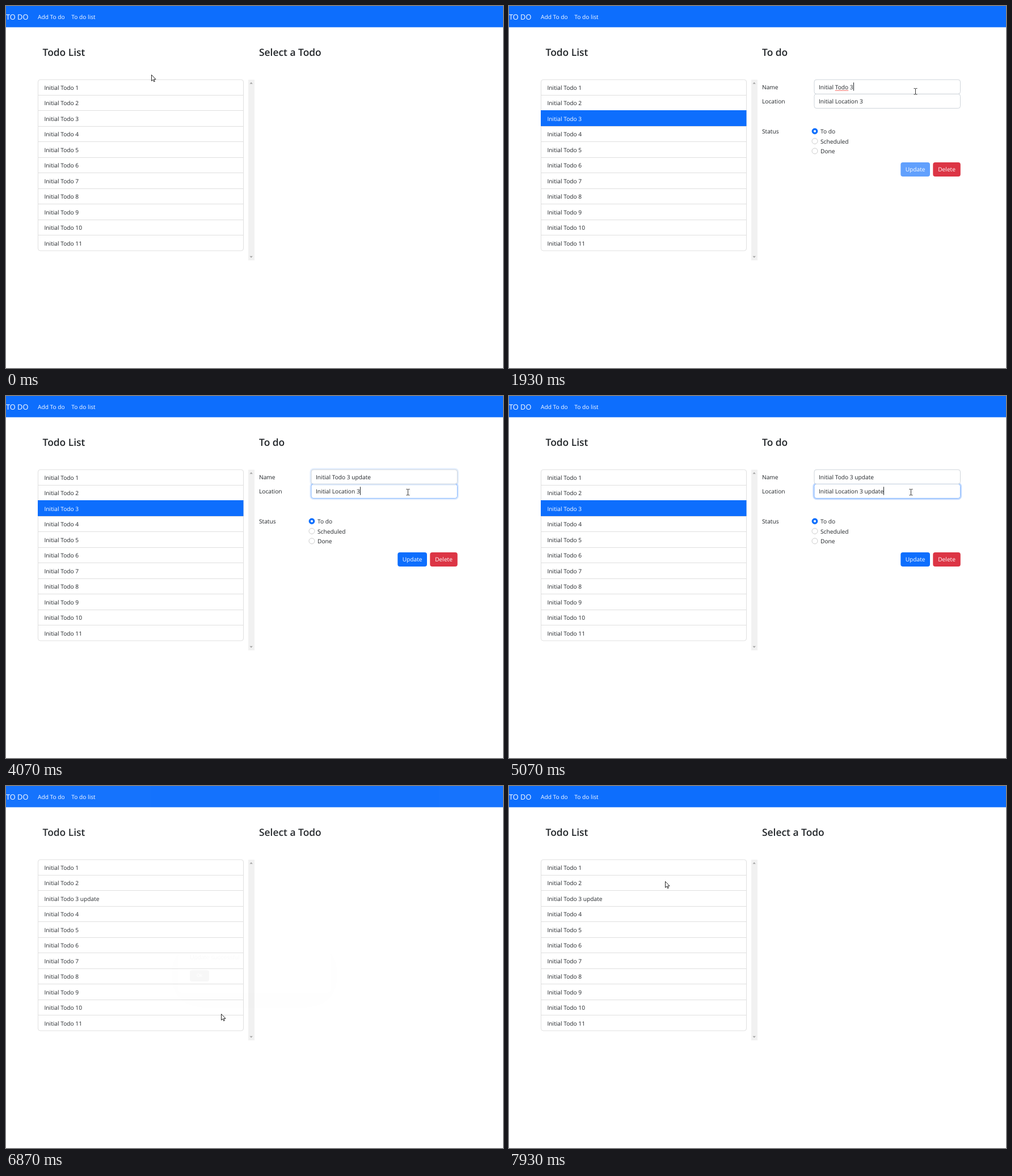
Write an HTML page that moves like this. It is 876 by 639 pixels and loops after 8 s.

```html
<!DOCTYPE html>
<html lang="en">
<head>
<meta charset="utf-8">
<title>Todo List</title>
<style>
  html, body { margin: 0; width: 100%; height: 100%; overflow: hidden; background: #fff; }
  #stage { position: relative; width: 876px; height: 639px; overflow: hidden; }
  svg, #veil { position: absolute; left: 0; top: 0; width: 876px; height: 639px; }
  text {
    font: 400 10.2px "Open Sans", "Noto Sans", sans-serif;
    fill: #212529; white-space: pre; text-rendering: geometricPrecision;
  }
  text.h { font-size: 17.4px; font-weight: 600; }
  text.brand { font-size: 12.8px; }
  text.w { fill: #fff; }
  text.mid { text-anchor: middle; }
  #veil { background: rgba(255, 255, 255, .9); visibility: hidden; }
  #box {
    position: absolute; left: 304px; top: 275px; width: 268px; height: 89.5px;
    border-radius: 6.7px; background: #fff; box-shadow: 0 13.4px 50px rgba(0, 0, 0, .13);
    font: 10.7px/14px "Liberation Sans", Arial, sans-serif; color: #666;
    text-rendering: geometricPrecision;
  }
  #box p { position: absolute; left: 20px; top: 20.5px; margin: 0; white-space: nowrap; }
  #ok {
    position: absolute; left: 20px; top: 49.5px; width: 34px; height: 20px;
    border-radius: 3.4px; background: #333; color: #eee;
    font-size: 8px; line-height: 20px; text-align: center;
  }
</style>
</head>
<body>
<div id="stage">
  <svg id="page"></svg>
  <div id="veil"><div id="box"><p>Update successful</p><div id="ok">Ok</div></div></div>
  <svg id="top"></svg>
</div>
<script>
const LOOP = 8000, BLUE = '#0d6efd', LINE = '#dfdfdf', ROW = 27.45;
const $ = id => document.getElementById(id);
const page = $('page');

function el(tag, attrs, parent = page) {
  const node = document.createElementNS('http://www.w3.org/2000/svg', tag);
  set(node, attrs);
  parent.appendChild(node);
  return node;
}
function set(node, attrs) {
  for (const k in attrs) node.setAttribute(k, attrs[k]);
}
function rect(x, y, width, height, fill, parent, more) {
  return el('rect', { x, y, width, height, fill, ...more }, parent);
}
function label(x, y, str, parent, cls = '') {
  const node = el('text', { x, y, class: cls }, parent);
  node.textContent = str;
  return node;
}
function show(node, on) { node.style.display = on ? '' : 'none'; }
const mix = (a, b, p) => a + (b - a) * p;
const clamp = v => Math.max(0, Math.min(1, v));
const smooth = p => p * p * (3 - 2 * p);

// Header
rect(0, 0, 876, 37.5, BLUE);
label(0, 24, 'TO DO', page, 'brand w');
label(56, 23, 'Add To do', page, 'w');
label(115.3, 23, 'To do list', page, 'w');
label(64.5, 88.3, 'Todo List', page, 'h');
const title = label(446, 88.3, '', page, 'h');

// List
const rowTop = i => Math.floor(130 + ROW * i);
rect(56.5, 130, 362, 302, '#fff', page, { rx: 4, stroke: LINE });
for (let i = 1; i < 11; i++) rect(57, rowTop(i), 361, 1, LINE);
const mark = rect(56, 0, 362.5, 28, BLUE);
const rows = Array.from({ length: 11 }, (_, i) =>
  label(67.5, 148 + ROW * i, 'Initial Todo ' + (i + 1)));

// Scrollbar
rect(427, 130, 11, 319, '#f1f1f1');
el('path', { d: 'M429.5 137.5h5.4l-2.7-3zM429.5 441.5h5.4l-2.7 3z', fill: '#a3a3a3' });

// Form
const form = el('g', {});
label(446, 146.6, 'Name', form);
label(446, 172, 'Location', form);
label(446, 225, 'Status', form);

function field(y) {
  const ring = rect(536.7, y - 1.3, 260.1, 28, 'none', form,
    { rx: 5.5, stroke: BLUE, 'stroke-opacity': .25, 'stroke-width': 2.7 });
  const frame = rect(538, y, 257.5, 25.3, '#fff', form, { rx: 4 });
  const text = label(546, y + 16.6, '', form);
  const caret = rect(0, y + 5, 1, 14.5, '#212529', form);
  return { ring, frame, text, caret };
}
const place = field(155.3), name = field(130);
const squiggle = rect(0, 148.6, 0, 1, '#f0615a', form);

const radios = ['To do', 'Scheduled', 'Done'].map((str, i) => {
  const at = { cx: 539, cy: 221 + 17.5 * i };
  label(549, at.cy + 4, str, form);
  return {
    ring: el('circle', { ...at, r: 6.7, fill: BLUE, 'fill-opacity': .25 }, form),
    disc: el('circle', { ...at, r: 5 }, form),
    dot: el('circle', { ...at, r: 2.1, fill: '#fff' }, form)
  };
});

function button(x, width, str, fill) {
  const g = el('g', {}, form);
  const face = rect(x, 276, width, 25, fill, g, { rx: 4 });
  label(x + width / 2, 292.4, str, g, 'w mid');
  return { g, face };
}
const update = button(690.3, 51.7, 'Update', BLUE);
button(747.3, 48.5, 'Delete', '#dc3545');

// Pointer
const arrow = el('path', {
  d: 'M.5.5V11.3L3 9l1.7 3.7 1.6-.7L4.7 8.4H8Z',
  fill: '#fff', stroke: '#111', 'stroke-width': .9
}, $('top'));
const beam = el('path', {
  d: 'M-2.5-4.5H-.5L.5-4l1-.5H3.500M.5-4V6M-2.5 6H-.5L.5 5.500l1 .5H3.500',
  fill: 'none', stroke: '#222', 'stroke-width': .9
}, $('top'));

// Pointer stops: time, x, y
const PATH = [
  [0, 256, 121], [200, 250, 140], [400, 250, 140], [730, 246, 166],
  [800, 246, 166], [1070, 239, 197], [1270, 239, 197], [1400, 300, 190],
  [1600, 500, 165], [1800, 680, 148], [1930, 716, 150], [3600, 716, 150],
  [4000, 708, 169], [5270, 708, 169], [5600, 550, 255], [5670, 533, 263],
  [5730, 536, 258], [5930, 536, 258], [6400, 712, 290], [6600, 716, 288],
  [6670, 690, 303], [6730, 620, 326], [6800, 480, 368], [6870, 379, 402],
  [7130, 354, 362], [7330, 339, 324], [7600, 339, 324], [7870, 270, 172],
  [7930, 275, 168], [LOOP, 275, 168]
];
function pointer(t) {
  const i = PATH.findIndex(p => p[0] > t);
  const a = PATH[i - 1], b = PATH[i], p = (t - a[0]) / (b[0] - a[0]);
  return [mix(a[1], b[1], p), mix(a[2], b[2], p)];
}

// A space at one moment, then "update" at 15 letters a second
function typed(t, space, start) {
  if (t < space) return '';
  const n = t < start ? 0 : Math.round((t - start) * .015) + 1;
  return '\u00a0' + 'update'.slice(0, n);
}

function drawField(f, str, focus, caretOn) {
  if (f.text.textContent !== str) f.text.textContent = str;
  set(f.ring, { opacity: focus });
  set(f.frame, { stroke: focus > .5 ? '#86b7fe' : '#ced4da' });
  show(f.caret, caretOn);
  if (caretOn) set(f.caret, { x: Math.round(546 + f.text.getComputedTextLength()) });
}

const fade = $('veil').animate([{ opacity: 0 }, { opacity: 1 }],
  { duration: 500, easing: 'ease', fill: 'both' });
fade.pause();

function draw(t) {
  const open = t >= 470 && t < 6600;
  const pick = t < 870 ? 0 : t < 1270 ? 1 : 2;
  const [x, y] = pointer(t);

  title.textContent = open ? 'To do' : 'Select a Todo';
  show(form, open);
  show(mark, open);
  set(mark, { y: rowTop(pick) });
  rows.forEach((r, i) => r.setAttribute('class', open && i === pick ? 'w' : ''));
  rows[2].textContent = 'Initial Todo 3' + (t >= 6600 ? ' update' : '');

  if (open) {
    const turn = at => smooth(clamp((t - at) / 130));
    const inName = t >= 1930 && t < 4000, inPlace = t >= 4000 && t < 5930;
    const nr = pick + 1;
    drawField(name, 'Initial Todo ' + nr + typed(t, 2600, 3070),
      turn(1930) - turn(4000), inName && !(t >= 2470 && t < 2600));
    drawField(place, 'Initial Location ' + nr + typed(t, 4530, 4730),
      turn(4000) - turn(5930), inPlace && t < 5600);
    show(squiggle, inName);
    if (inName) set(squiggle, {
      x: 546 + name.text.getSubStringLength(0, 8),
      width: name.text.getSubStringLength(8, 4)
    });

    const state = pick === 0 ? 1 : t >= 5930 ? 2 : 0;
    radios.forEach((r, i) => {
      const on = i === state;
      set(r.disc, { fill: on ? BLUE : '#fff', stroke: on ? BLUE : '#bfbfbf', 'stroke-width': .8 });
      show(r.dot, on);
      show(r.ring, i === 2 && t >= 5930);
    });

    const hover = x > 690 && x < 742 && y > 276 && y < 301;
    set(update.g, { opacity: t < 2600 ? .65 : 1 });
    set(update.face, { fill: hover ? '#0b5ed7' : BLUE });
  }

  $('veil').style.visibility = t >= 6840 && t < 7530 ? 'visible' : 'hidden';
  fade.currentTime = Math.max(0, Math.min(500, t - 6842));

  const overText = open && x > 538 && x < 796 && y > 130 && y < 181;
  const move = { transform: `translate(${Math.round(x)} ${Math.round(y)})` };
  show(arrow, !overText);
  show(beam, overText);
  set(arrow, move);
  set(beam, move);
}

// The screen refreshes 15 times a second, with times rounded to 10 ms
const begin = performance.now();
function tick() {
  const t = (performance.now() - begin) % LOOP;
  const step = Math.floor((t + 4) * .015) / .015;
  draw(Math.round(step / 10) * 10 % LOOP);
  requestAnimationFrame(tick);
}
tick();
</script>
</body>
</html>
```
